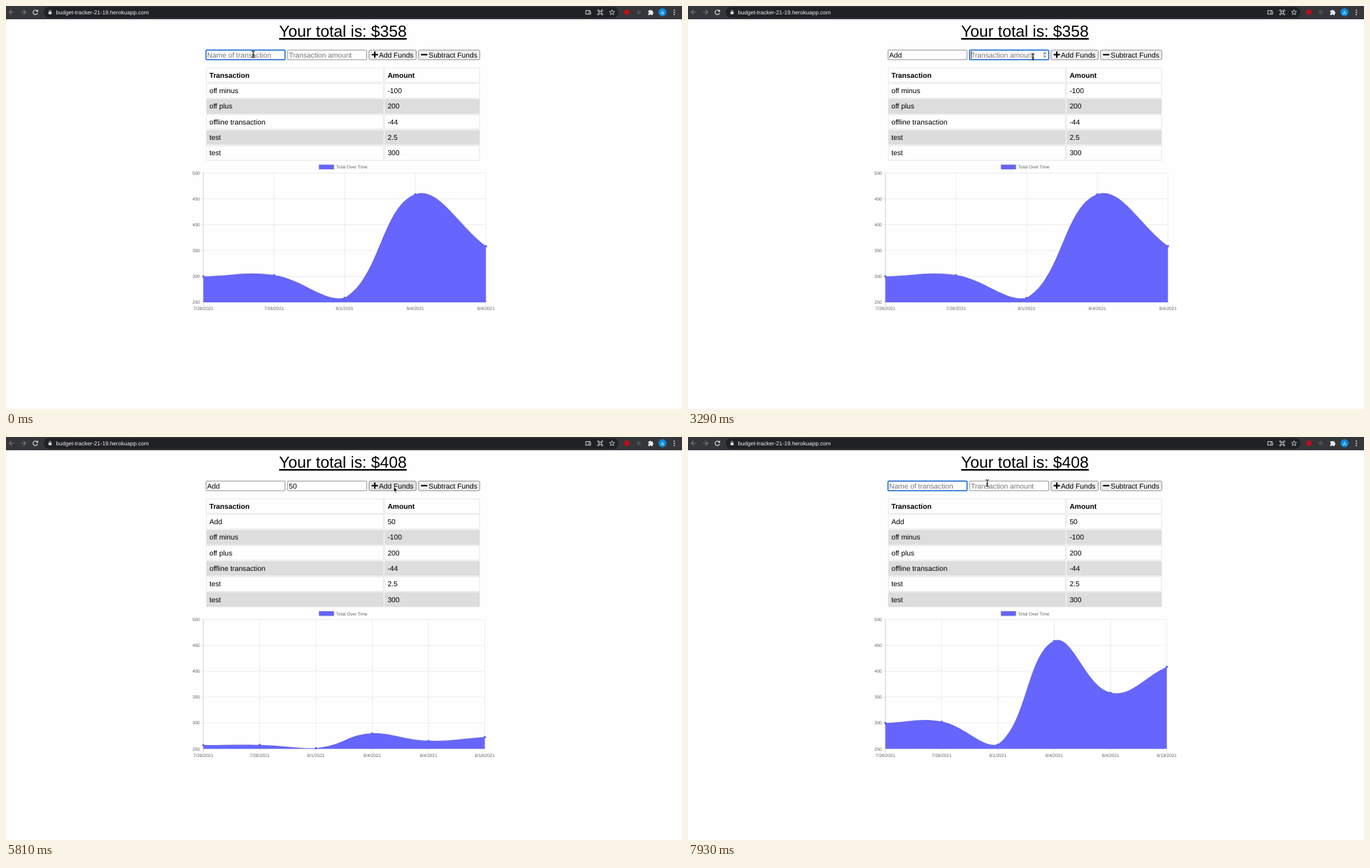
An HTML page for the animation above (8 s loop, 968x578 px).

```html
<!DOCTYPE html>
<html lang="en">
<head>
<meta charset="utf-8">
<title>Budget tracker</title>
<style>
  html, body { margin: 0; width: 100%; height: 100%; overflow: hidden; background: #fefefe; }
  svg { display: block; width: 968px; height: 578px; }
  text { font: 10.25px "Liberation Sans", Arial, sans-serif; text-rendering: geometricPrecision; white-space: pre; }
  .bold { font-weight: bold; }
  .title { font-size: 22.95px; text-anchor: middle; text-decoration: underline; }
  .chart text { font-size: 6.45px; fill: #666; }
  .mid { text-anchor: middle; }
  .end { text-anchor: end; }
  .icon { fill: none; stroke: #dfe1e4; stroke-width: 1.1; }
</style>
</head>
<body>
<svg viewBox="0 0 968 578">
  <rect width="968" height="578" fill="#fefefe"/>
  <g id="bar">
    <rect width="968" height="19" fill="#35363a"/>
    <rect x="54" y="1.5" width="823" height="15.5" rx="7.75" fill="#202124"/>
    <g class="icon">
      <path d="M11.5 9H4.8M8 5.7 4.7 9 8 12.3M21.5 9h6.7M25 5.7 28.3 9 25 12.3" stroke="#77797d"/>
      <path d="M44.6 6.9A3.3 3.3 0 1 0 45.3 9.9"/>
      <path d="M46 5v3.2h-3.2z" fill="#dfe1e4" stroke="none"/>
      <path d="M61.8 8.5V7.4a1.3 1.3 0 0 1 2.6 0v1.1" stroke-width=".8"/>
      <rect x="60.9" y="8.2" width="4.4" height="3.6" rx=".5" fill="#dfe1e4" stroke="none"/>
      <path d="M834 11.7h-4.5M830.3 11V6.5h6.7M834.6 8.2h2.6v3.6h-2.6z" stroke-width=".9"/>
      <path d="M849.3 7.5h3.2v3.2h-3.2zM849.3 7.5h-1.1a1.1 1.1 0 1 1 1.1-1.1zM852.5 7.5V6.4a1.1 1.1 0 1 1 1.1 1.1zM852.5 10.7h1.1a1.1 1.1 0 1 1-1.1 1.1zM849.3 10.7v1.1a1.1 1.1 0 1 1-1.1-1.1z" stroke-width=".8"/>
      <path d="M867.8 5.4l1 2.5 2.7.2-2.1 1.7.7 2.6-2.3-1.4-2.3 1.4.7-2.6-2.1-1.7 2.7-.2z" stroke-width=".8"/>
    </g>
    <text x="71.5" y="11.9" fill="#f1f1f2" style="font-size:8.05px">budget-tracker-21-19.herokuapp.com</text>
    <circle cx="889" cy="9" r="3.9" fill="#b80f1c"/>
    <circle cx="906" cy="9" r="3" fill="#4b4c50"/>
    <path d="M919.6 6.6h2a1.2 1.2 0 1 1 2.4 0h2v2a1.2 1.2 0 1 1 0 2.4v2h-2.2a1.1 1.1 0 0 0-2.2 0h-2v-2.2a1.1 1.1 0 0 0 0-2.2z" fill="#e8eaed"/>
    <circle cx="940" cy="9" r="5.7" fill="#0c8ce0"/>
    <text class="mid" x="940" y="11.5" fill="#fff" style="font-size:7px">A</text>
    <g fill="#e8eaed"><circle cx="957" cy="5.8" r=".9"/><circle cx="957" cy="9" r=".9"/><circle cx="957" cy="12.2" r=".9"/></g>
  </g>
  <text id="total" class="title" x="482.5" y="44"></text>
  <g id="form">
    <rect id="nameBox" x="286.4" y="63.2" width="113.2" height="13.8" rx="1"/>
    <rect id="amountBox" x="403.2" y="63.2" width="113.4" height="13.8" rx="1"/>
    <text id="name" x="288" y="73.6"></text>
    <text id="amount" x="405" y="73.6"></text>
    <g id="spin">
      <rect x="507.8" y="65.3" width="6" height="9.6" fill="#efefef"/>
      <path d="M509 68.8l1.8-2.2 1.8 2.2zM509 71.4l1.8 2.2 1.8-2.2z" fill="#505050"/>
    </g>
    <rect id="caret" y="64.6" width=".8" height="11"/>
    <g stroke="#767676" stroke-width=".8">
      <rect id="addBtn" x="519.8" y="63.2" width="67.6" height="13.8" rx="1.7"/>
      <rect x="590.8" y="63.2" width="87.6" height="13.8" rx="1.7" fill="#efefef"/>
    </g>
    <path d="M524.4 69.7h7.4M528.1 66v7.4M595 69.7h7.6" fill="none" stroke="#000" stroke-width="2" stroke-linecap="round"/>
    <text x="533.9" y="73.6">Add Funds</text>
    <text x="605.3" y="73.6">Subtract Funds</text>
  </g>
  <g id="table"></g>
  <g id="chart" class="chart"></g>
  <g id="beam" fill="none" stroke-linecap="round">
    <path id="beamPath" d="M-1.8-4.6Q0-4.6 0-3.4Q0-4.6 1.8-4.6M0-3.4V3.4M-1.8 4.6Q0 4.6 0 3.4Q0 4.6 1.8 4.6M-1 1.2H1" stroke="#fff" stroke-opacity=".7" stroke-width="1.7"/>
    <use href="#beamLine"/>
    <path id="beamLine" d="M-1.8-4.6Q0-4.6 0-3.4Q0-4.6 1.8-4.6M0-3.4V3.4M-1.8 4.6Q0 4.6 0 3.4Q0 4.6 1.8 4.6M-1 1.2H1" stroke="#111" stroke-width=".8"/>
  </g>
  <path id="arrow" d="M0 0V7.8L1.8 6.2 3 8.9 4.2 8.4 3 5.7H5.5Z" fill="#000" stroke="#fff" stroke-width=".7"/>
</svg>
<script>
const LOOP = 8000, ADDED = 5810, CHART_START = 5772, CHART_MS = 1000;
const $ = id => document.getElementById(id);

// Each track is a list of [start, value...] entries that hold until the next one.
const nameTrack = [[0, ''], [620, 'A'], [920, 'Ad'], [1070, 'Add'], [7180, '']];
const amountTrack = [[0, ''], [4030, '5'], [4330, '50'], [7180, '']];
const focusTrack = [[0, 'name'], [2850, 'amount'], [5660, ''], [7180, 'name']];
const caretTrack = [[0, 0], [290, 1], [1520, 0], [1970, 1], [2550, 0], [2850, 1],
  [3440, 0], [3890, 1], [4930, 0], [7180, 1], [7780, 0]];
const hoverTrack = [[0, 0], [2110, 1], [2400, 0], [5370, 1], [6250, 0]];
const drawTrack = [[0], [5810], [5950], [6100], [6250], [6400], [6580], [6730], [6880]];
const pointerTrack = [
  [0, 'beam', 354, 69.3], [620, ''], [1670, 'beam', 372, 69], [1820, 'beam', 425, 69.5],
  [1970, 'beam', 486, 70], [2110, 'arrow', 530, 68], [2260, 'arrow', 524, 68],
  [2400, 'beam', 516.6, 69.3], [2550, 'beam', 512, 70], [2700, 'beam', 504, 71],
  [3000, 'beam', 498, 72], [3150, 'beam', 494, 73], [3590, 'beam', 492.5, 74.5],
  [5080, 'beam', 500, 74], [5220, 'beam', 512, 73], [5370, 'arrow', 540, 71],
  [5520, 'arrow', 555.3, 71.3], [5950, 'arrow', 556.5, 74], [6100, 'arrow', 559, 84.5],
  [6250, 'arrow', 543, 87], [6400, 'arrow', 500, 85], [6580, 'arrow', 438, 81],
  [6730, 'arrow', 396.5, 77], [6880, 'beam', 375, 72], [7030, 'beam', 364, 70],
  [7180, 'beam', 361, 70], [7780, 'beam', 396, 67.5], [7930, 'beam', 428.5, 66]
];
const rows = [['off minus', -100], ['off plus', 200], ['offline transaction', -44], ['test', 2.5], ['test', 300]];
const dates = ['7/28/2021', '7/28/2021', '8/1/2021', '8/4/2021', '8/4/2021', '8/18/2021'];
const totals = [300, 302.5, 258.5, 458.5, 358.5, 408.5];
const PITCH = 22.32, LEFT = 282.6, TOP = 239.4, BASE = 425;

const at = (track, t) => track.reduce((hit, step) => step[0] <= t ? step : hit);
const text = (x, y, s, cls = '') => `<text x="${x}" y="${y}" class="${cls}">${s}</text>`;
const line = (x1, y1, x2, y2, color = 'rgba(0,0,0,.1)') =>
  `<path d="M${x1} ${y1}L${x2} ${y2}" stroke="${color}" stroke-width=".7"/>`;

function tableMarkup(list) {
  return [['Transaction', 'Amount'], ...list].map((row, i) => {
    const y = 88.9 + i * PITCH, fill = i && i % 2 === 0 ? '#ddd' : 'none';
    const cls = i ? '' : 'bold';
    const cell = (x, w) => `<rect x="${x}" y="${y}" width="${w}" height="20.7" fill="${fill}" stroke="#ddd" stroke-width=".7"/>`;
    return cell(287, 253.6) + cell(542.1, 136) +
      text(291.2, y + 13.8, row[0], cls) + text(546.4, y + 13.8, row[1], cls);
  }).join('');
}

// Control points for a 0.4 tension spline, kept inside the plot area.
function spline(points) {
  const dist = (a, b) => Math.hypot(a.x - b.x, a.y - b.y);
  const clamp = y => Math.min(BASE, Math.max(TOP, y));
  return points.map((p, i) => {
    const a = points[i - 1] || p, b = points[i + 1] || p;
    const before = dist(a, p), after = dist(p, b), k = 0.4 / (before + after);
    const handle = f => ({ x: p.x + f * (b.x - a.x), y: clamp(p.y + f * (b.y - a.y)) });
    return { p, from: handle(-k * before), to: handle(k * after) };
  });
}

function chartMarkup(count, grow) {
  const right = count === 5 ? 687.2 : 685.6, step = (right - LEFT) / (count - 1);
  const valueY = v => BASE - (v - 250) / 250 * (BASE - TOP);
  const knots = spline(totals.slice(0, count).map((v, i) => ({ x: LEFT + i * step, y: valueY(v) })));
  const rise = y => BASE - (BASE - y) * grow;
  const xy = q => `${q.x.toFixed(2)} ${rise(q.y).toFixed(2)}`;
  let out = `<rect x="448.3" y="227.7" width="21.2" height="6.4" fill="#66f" stroke="rgba(0,0,0,.1)" stroke-width="1.6"/>` +
    text(472.6, 233.2, 'Total Over Time');
  for (let v = 250; v <= 500; v += 50) {
    out += line(278.2, valueY(v), right, valueY(v)) + text(277.7, valueY(v) + 2.3, v, 'end');
  }
  knots.forEach(({ p }, i) => {
    out += line(p.x, TOP, p.x, BASE + 5, i ? undefined : 'rgba(0,0,0,.25)') + text(p.x, 436.2, dates[i], 'mid');
  });
  const curve = knots.map((k, i) => i ? `C${xy(knots[i - 1].to)} ${xy(k.from)} ${xy(k.p)}` : `M${xy(k.p)}`).join('');
  out += `<path d="${curve}V${BASE}H${LEFT}Z" fill="#66f"/>` +
    `<path d="${curve}" fill="none" stroke="rgba(0,0,0,.1)" stroke-width="1.6"/>`;
  return out + knots.map(({ p }) =>
    `<circle cx="${p.x}" cy="${rise(p.y)}" r="1.6" fill="#66f" stroke="rgba(0,0,0,.1)" stroke-width=".55"/>`).join('');
}

function show(id, on) { $(id).style.display = on ? '' : 'none'; }

function field(id, value, hint, focused) {
  const box = $(id + 'Box');
  box.setAttribute('fill', '#fff');
  box.setAttribute('stroke', focused ? '#1565cf' : '#767676');
  box.setAttribute('stroke-width', focused ? 1.5 : 0.8);
  $(id).textContent = value || hint;
  $(id).setAttribute('fill', value ? '#000' : '#757575');
}

let drawn = -1;
function drawPage(t) {
  const stamp = at(drawTrack, t)[0];
  if (stamp === drawn) return;
  drawn = stamp;
  const added = stamp >= ADDED;
  const u = added ? Math.min(1, (stamp - CHART_START) / CHART_MS) : 1;
  $('total').textContent = 'Your total is: $' + (added ? 408 : 358);
  $('table').innerHTML = tableMarkup(added ? [['Add', 50], ...rows] : rows);
  $('chart').innerHTML = chartMarkup(added ? 6 : 5, 1 - (1 - u) ** 4);
  $('chart').setAttribute('transform', `translate(0 ${added ? PITCH : 0})`);
}

function render(t) {
  drawPage(t);
  const focus = at(focusTrack, t)[1];
  const values = { name: at(nameTrack, t)[1], amount: at(amountTrack, t)[1] };
  field('name', values.name, 'Name of transaction', focus === 'name');
  field('amount', values.amount, 'Transaction amount', focus === 'amount');
  show('spin', focus === 'amount');
  show('caret', focus && at(caretTrack, t)[1]);
  if (focus) {
    const label = $(focus), width = values[focus] ? label.getComputedTextLength() : 0;
    $('caret').setAttribute('x', +label.getAttribute('x') + width);
  }
  $('addBtn').setAttribute('fill', at(hoverTrack, t)[1] ? '#e1e1e1' : '#efefef');
  const [, kind, x, y] = at(pointerTrack, t);
  for (const id of ['beam', 'arrow']) {
    show(id, id === kind);
    if (id === kind) $(id).setAttribute('transform', `translate(${x} ${y})`);
  }
}

function tick() {
  render(performance.now() % LOOP);
  requestAnimationFrame(tick);
}
tick();
</script>
</body>
</html>
```
